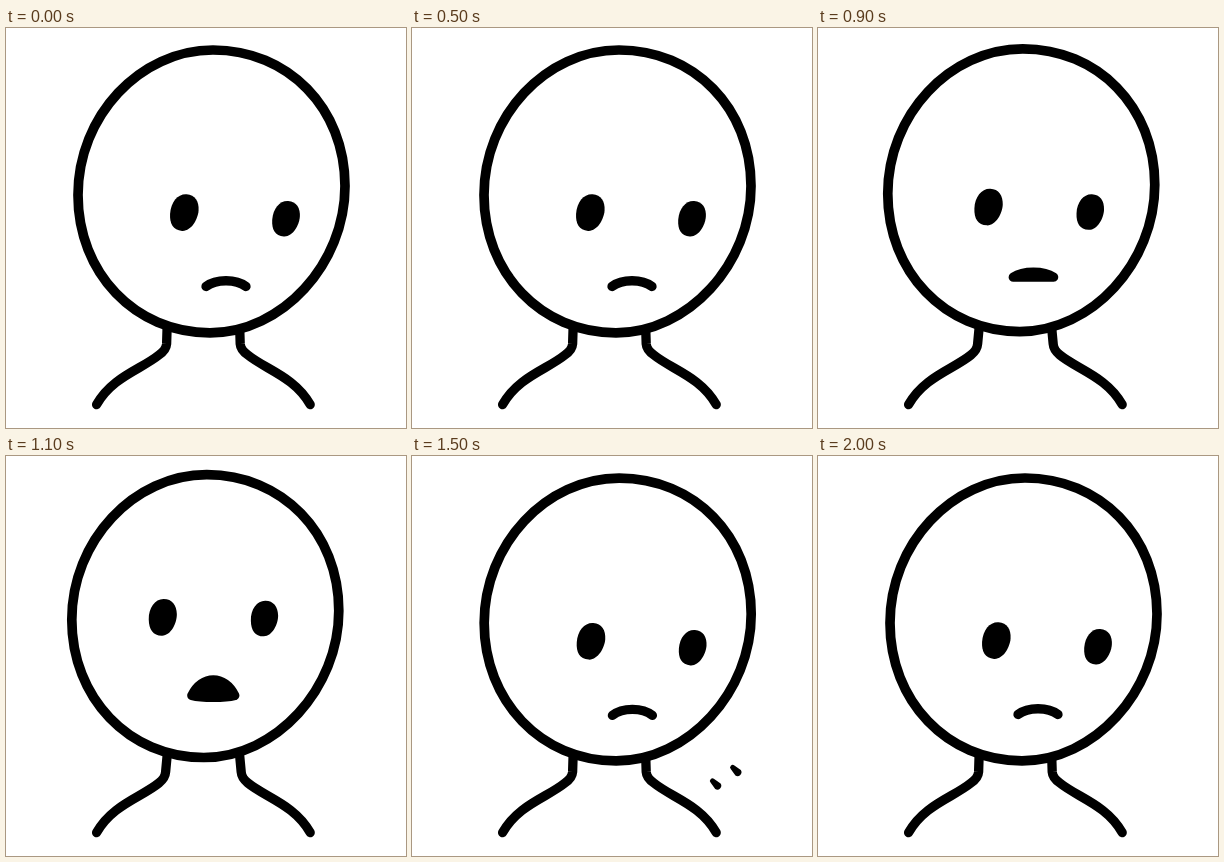
Recreate the animation shown at these times as an HTML page. Size 400x400 px, loop 2.1 s.

```html
<!DOCTYPE html>
<html lang="en">
<head>
<meta charset="utf-8">
<title>Sighing figure</title>
<style>
  html, body { margin: 0; width: 100%; height: 100%; overflow: hidden; background: #fff; }
  svg { display: block; width: 100vw; height: 100vh; }
  .line { fill: none; stroke: #000; stroke-width: 9.3; stroke-linecap: round; stroke-linejoin: round; }
  #head { fill: #fff; stroke-width: 9.7; }
  #mouth { fill: #000; }
</style>
</head>
<body>
<svg viewBox="0 0 400 400">
  <defs>
    <path id="eye" d="M-14.1 2C-14.1 -10 -7.5 -18.4 1 -18.4S14.1 -12 14.1 -3S8 18.4 -1 18.4S-14.1 12 -14.1 2Z"/>
    <path id="puff" d="M-4.3 -.6A2.5 2.5 0 0 1 -.8 -4.2L5.6 .2A3.9 3.9 0 0 1 .2 5.6Z"/>
  </defs>
  <path id="neckL" class="line"/>
  <path id="neckR" class="line"/>
  <path id="head" class="line" d="M72 167C72 88 134 22 207 22C282 22 339 80 339 158C339 236 276 304.8 204 304.8C129 304.8 72 245 72 167Z"/>
  <use id="eyeL" href="#eye"/>
  <use id="eyeR" href="#eye"/>
  <path id="mouth" class="line"/>
  <g id="puffs">
    <use href="#puff" x="307" y="331.3"/>
    <use href="#puff" x="327.2" y="317.8"/>
  </g>
</svg>
<script>
const LOOP = 2100, STEP = 100;
const el = id => document.getElementById(id);
const set = (id, name, value) => el(id).setAttribute(name, value);
const clamp = (v, lo, hi) => Math.min(hi, Math.max(lo, v));
const ramp = (t, from, to) => clamp((t - from) / (to - from), 0, 1);
const easeIn = p => p * p;
const easeOut = p => p * (2 - p);

// breath: 0 at rest, 1 fully inhaled, slightly below 0 during the sigh
const SAG = 0.16;
const breathAt = t => easeIn(ramp(t, 600, 1100))
  - (1 + SAG) * easeOut(ramp(t, 1300, 1600))
  + SAG * ramp(t, 1700, 2000);

function neck(side, slant) {
  const x = d => 197.4 + side * d;
  const low = 36.8 + slant;
  return `M${x(36.3)} 300L${x(low)} 316Q${x(low + 0.4)} 322 ${x(44.5)} 327` +
    `C${x(61.5)} 341 ${x(91.5)} 349 ${x(106.8)} 376.6`;
}

function mouth(b) {
  const x = 220 - 12.7 * b, y = 258.5 - 30 * b + 11 * b * b;
  const up = 7.7 - 12.4 * b + 25.6 * b * b;
  const low = Math.min(up, Math.max(-2.5, 7.7 - 21 * b));
  const half = 20 + 1.5 * b * b;
  const l = x - half, r = x + half, cl = l + 10, cr = r - 10;
  return `M${l} ${y}C${cl} ${y - up} ${cr} ${y - up} ${r} ${y}` +
    `C${cr} ${y - low} ${cl} ${y - low} ${l} ${y}Z`;
}

function draw(t) {
  const b = breathAt(t);
  const rise = b > 0 ? b ** 1.4 : b;
  const eye = (x, y, lift, size) =>
    `translate(${x - 21.5 * b} ${y - lift * rise}) rotate(${4 - 5 * b}) scale(${size})`;

  set('head', 'transform', `translate(${-6.2 * b} ${-3.3 * b})`);
  set('eyeL', 'transform', eye(178.3, 184.6, 23.3, 1));
  set('eyeR', 'transform', eye(280, 190.8, 28.3, 0.97));
  set('mouth', 'd', mouth(b));

  const slant = clamp(3 * b, 0, 1);
  set('neckL', 'd', neck(-1, slant));
  set('neckR', 'd', neck(1, slant));

  const drift = (t - 1700) / 50;
  set('puffs', 'visibility', t >= 1500 && t <= 1700 ? 'visible' : 'hidden');
  set('puffs', 'transform', `translate(${drift} ${drift})`);
}

const start = performance.now();
function tick(now) {
  const t = Math.max(0, now - start) % LOOP;
  draw(Math.floor(t / STEP) * STEP);
  requestAnimationFrame(tick);
}
draw(0);
requestAnimationFrame(tick);
</script>
</body>
</html>
```
